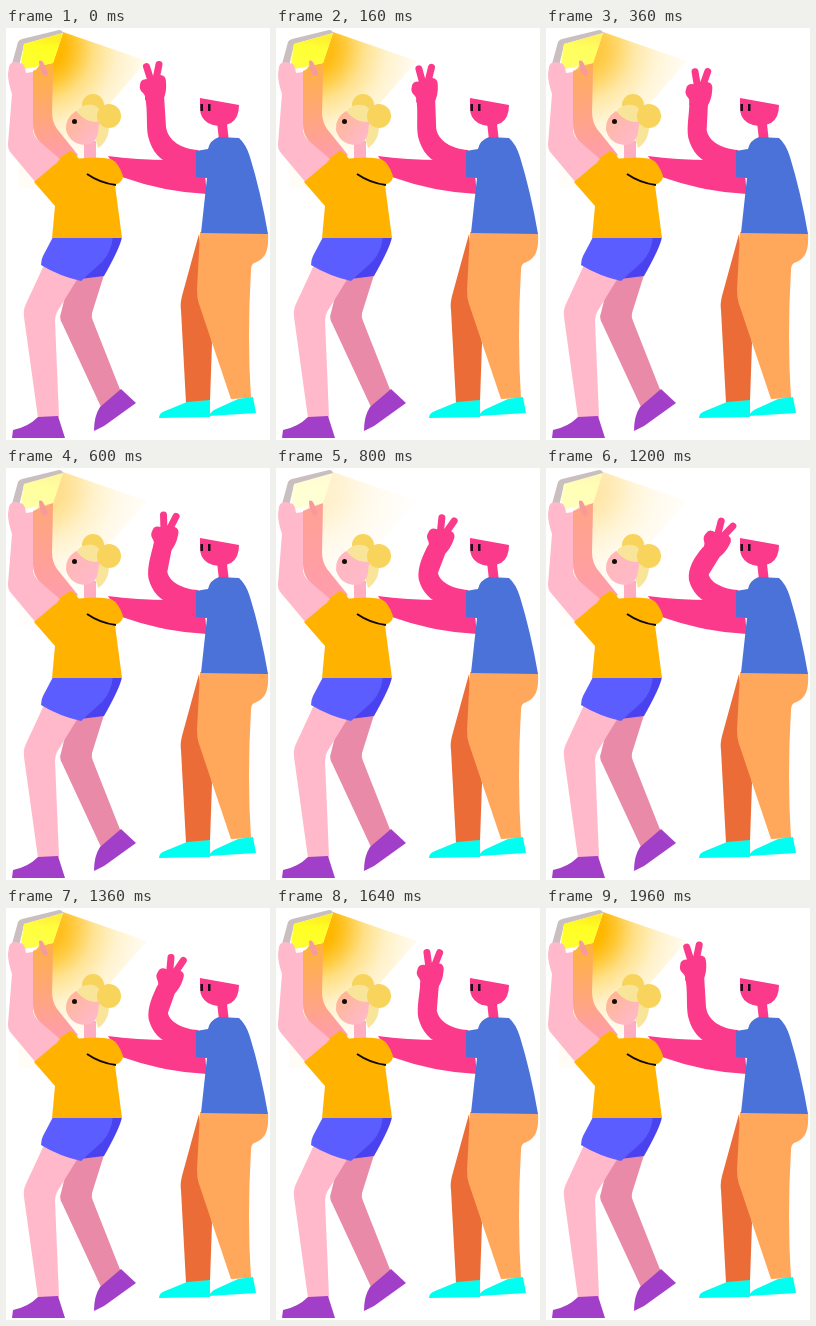
Recreate the animation shown at these times as an HTML page. Size 264x412 px, loop 2 s.

```html
<!DOCTYPE html>
<html lang="en">
<head>
<meta charset="utf-8">
<title>Selfie</title>
<style>
  html, body { margin: 0; width: 100%; height: 100%; overflow: hidden; background: #fff; }
  svg { display: block; width: 264px; height: 412px; }
  .skin { fill: #ffb9ca; }
  .shade { fill: #ff9dab; }
  .pink { fill: #fb3a8b; }
  .shoe { fill: #a23fc8; }
  .teal { fill: #00fff0; }
  .top { fill: #ffb300; }
</style>
</head>
<body>
<svg viewBox="0 0 264 412">
  <defs>
    <radialGradient id="beam" gradientUnits="userSpaceOnUse" cx="34" cy="20" r="128">
      <stop offset=".18" stop-color="#ffb700"/>
      <stop offset=".28" stop-color="#ffb900" stop-opacity=".82"/>
      <stop offset=".42" stop-color="#ffbd00" stop-opacity=".48"/>
      <stop offset=".6" stop-color="#ffc000" stop-opacity=".22"/>
      <stop offset=".8" stop-color="#ffc000" stop-opacity=".08"/>
      <stop offset="1" stop-color="#ffc000" stop-opacity=".04"/>
    </radialGradient>
    <linearGradient id="tint" gradientUnits="userSpaceOnUse" x1="42" y1="36" x2="54" y2="128">
      <stop offset="0" stop-color="#ffb52e" stop-opacity=".9"/>
      <stop offset="1" stop-color="#ffb52e" stop-opacity="0"/>
    </linearGradient>
    <linearGradient id="flush" gradientUnits="userSpaceOnUse" x1="60" y1="84" x2="90" y2="112">
      <stop offset="0" stop-color="#ffb52e" stop-opacity=".4"/>
      <stop offset="1" stop-color="#ffb52e" stop-opacity="0"/>
    </linearGradient>
    <linearGradient id="screen" gradientUnits="userSpaceOnUse" x1="38" y1="9" x2="34" y2="38">
      <stop offset="0" stop-color="#ffee20"/>
      <stop offset=".35" stop-color="#ffff24"/>
      <stop offset="1" stop-color="#ffff30"/>
    </linearGradient>
    <path id="backArm" d="M27 43L47 35L46 84Q46 94 51 101L72 127L54 140L32 112Q27 105 27 96Z"/>
    <path id="face" d="M70 83Q82 97 94 93Q92 99 92 105Q90 116 79 117Q64 116 60 102Q59 90 70 83Z"/>
  </defs>

  <path class="glow" fill="url(#beam)" d="M57 4L141 33L100 80L60 160H13V70L30 42Z"/>

  <!-- friend on the right -->
  <path class="pink" d="M102 128Q130 132 165 132L198 138L201 166Q158 164 116 149Z"/>
  <path class="pink" id="arm"/>
  <g class="pink" id="hand">
    <path d="M134 57Q134 51 141 51L154 47Q160 47 160 54Q161 64 157 72H139Q140 67 136 64Q133 61 134 57Z"/>
    <path fill="none" stroke="#fb3a8b" stroke-width="7" stroke-linecap="round" d="M140.500 38.500L146 56M153 36.500L149 56"/>
  </g>
  <path fill="#ec6c38" d="M193 206L176 268Q174 276 175 282L180 375L204 373L206 315L196 235Z"/>
  <path fill="#ffa75a" d="M194 204L262 205C263 222 260 231 248 235Q245 237 245 242Q241 310 245 370L225 371L193 276Q191 270 191 262Z"/>
  <path class="teal" d="M153 390Q153 385 159 383L181 374L204 372V389Z"/>
  <path class="teal" d="M203 388Q204 384 210 381L232 371L247 369L250 385Z"/>
  <path class="pink" d="M211 94L221 96L223 114L213 112Z"/>
  <path class="pink" d="M194 70L233 77Q233 90 225 95Q213 101 202 95Q194 90 194 80Z"/>
  <path fill="#160c18" d="M194.500 76H197V83H194.500ZM202 76H204.500V83H202Z"/>
  <path fill="#4a72d9" d="M190 123L202 121Q204 112 213 109L233 110Q240 116 244 129Q255 165 262 206L195 205L201 150L190 149Z"/>

  <!-- friend on the left -->
  <use href="#backArm" class="shade"/>
  <use href="#backArm" class="glow" fill="url(#tint)"/>
  <path class="top" d="M49 133L64 123Q69 125 73 131L60 140Z"/>
  <path fill="#c9bfc0" d="M6 36L12 14Q13 12 16 11L53 2Q57 2 57 6L18 17L13 38Z"/>
  <path fill="#fff" d="M18 16L57 5L47 35L14 42Z"/>
  <path class="glow" fill="url(#screen)" d="M18 16L57 5L47 35L14 42Z"/>
  <path fill="#f79a9b" d="M33 33Q36 31 38 36L42 45Q41 50 37 47Q33 41 33 33Z"/>
  <path class="skin" d="M3 39Q4 34 10 34L17 36Q20 40 20 45L27 44V103Q28 109 33 113L54 131L31 156L5 125Q2 122 2 116L6 66Q2 54 2 46Z"/>

  <path fill="#e98aa9" d="M64 248L98 247L86 285Q85 289 87 293L115 364L95 379L56 295Q53 290 55 285Z"/>
  <path class="skin" d="M38 237L72 250L51 284Q49 288 49 293L53 389L32 390L18 289Q17 283 19 278Z"/>
  <path class="shoe" d="M6 410L7 402Q22 399 32 389L52 388L59 410Z"/>
  <path class="shoe" d="M88 403Q88 388 94 379L115 361L130 375L98 398Z"/>
  <path fill="#4a42ef" d="M98 209H116Q114 220 98 248L74 251Z"/>
  <path fill="#5b5dff" d="M47 209H107Q105 225 96 234L75 253Q53 248 35 237Q35 232 37 228Z"/>

  <path fill="#ffaec1" d="M78 112L90 113V132H78Z"/>
  <circle fill="#f8d45c" cx="87" cy="77" r="11"/>
  <path fill="#f9e59a" d="M70 84Q77 74 90 78L103 90Q105 112 92 120L88 106Z"/>
  <use href="#face" class="skin"/>
  <use href="#face" class="glow" fill="url(#flush)"/>
  <circle fill="#f8d45c" cx="103" cy="88" r="12"/>
  <circle fill="#160c08" cx="68.500" cy="93.500" r="2.500"/>
  <path class="top" d="M28 154L48 137Q51 133 57 137L68 131Q92 128 105 131Q113 135 117 148Q117 154 109 157L116 210H46L49 178Z"/>
  <path fill="none" stroke="#120b04" stroke-width="2" d="M81 146Q94 155 110 157"/>
</svg>
<script>
  const LOOP = 2000;
  const swing = [[0, 0], [360, .22], [800, .65], [1080, 1], [1360, .63], [1640, .27], [2000, 0]];
  const light = [[0, 1], [360, .74], [800, .2], [1080, 0], [1360, .88], [1640, 1], [2000, 1]];

  const arm = document.getElementById('arm');
  const hand = document.getElementById('hand');
  const glows = document.querySelectorAll('.glow');

  // Monotone cubic through the keys, flat at both ends and at every turn.
  const rise = (keys, i) => (keys[i + 1][1] - keys[i][1]) / (keys[i + 1][0] - keys[i][0]);
  function slope(keys, i) {
    if (i === 0 || i === keys.length - 1) return 0;
    const a = rise(keys, i - 1), b = rise(keys, i);
    return a * b > 0 ? 2 * a * b / (a + b) : 0;
  }
  function sample(keys, t) {
    let i = 0;
    while (i < keys.length - 2 && t >= keys[i + 1][0]) i++;
    const [t0, v0] = keys[i], [t1, v1] = keys[i + 1];
    const h = t1 - t0, u = (t - t0) / h, w = 1 - u;
    return v0 * (1 + 2 * u) * w * w + v1 * (3 - 2 * u) * u * u
      + h * u * w * (slope(keys, i) * w - slope(keys, i + 1) * u);
  }

  // The wrist drops early in the swing, so height runs ahead of sideways travel.
  function pose(p) {
    const q = Math.pow(Math.max(p, 0), .65);
    const pt = (x0, y0, x1, y1) =>
      (x0 + (x1 - x0) * p).toFixed(2) + ' ' + (y0 + (y1 - y0) * q).toFixed(2) + ' ';
    arm.setAttribute('d',
      'M192 122C' + pt(176, 121, 178, 121) + pt(162, 113, 165, 115) + pt(160, 99, 163, 107) +
      'L' + pt(158, 67, 176, 90) + 'L' + pt(139, 69, 159, 80) +
      'C' + pt(142, 82, 149, 90) + pt(140, 97, 142, 100) + pt(142, 108, 143, 112) +
      'C146 124 154 133 168 137L200 150Z');
    hand.setAttribute('transform',
      `translate(${25 * p} ${16 * q}) rotate(${36 * p} 147 60)`);
  }

  function draw() {
    const t = performance.now() % LOOP;
    pose(sample(swing, t));
    const level = sample(light, t);
    glows.forEach(g => g.setAttribute('opacity', level));
    requestAnimationFrame(draw);
  }
  draw();
</script>
</body>
</html>
```
